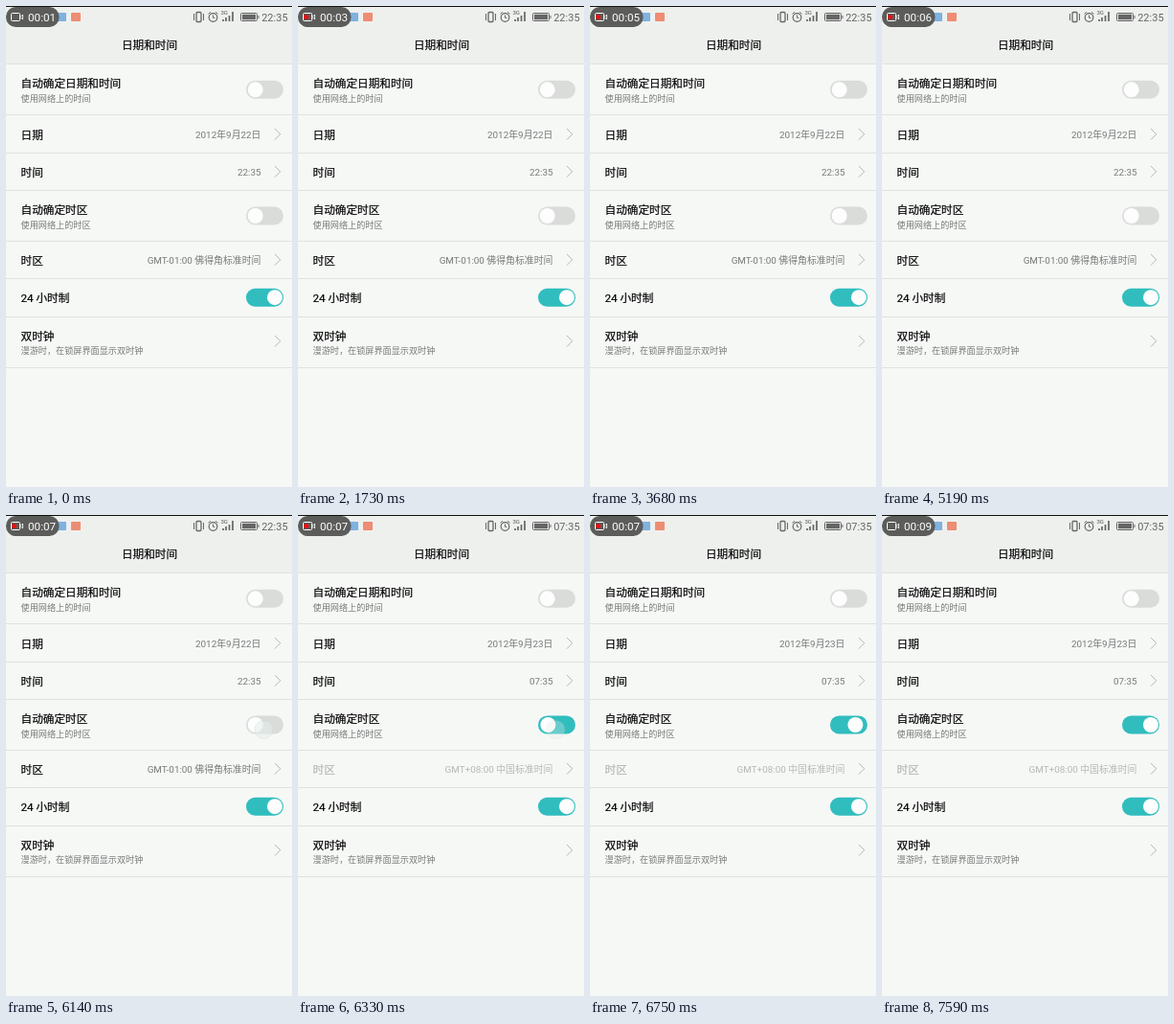
Animation, 299 px wide and 502 px high, one loop 8000 ms. Source, as an HTML page:

```html
<!DOCTYPE html>
<html lang="zh-CN">
<head>
<meta charset="utf-8">
<title>日期和时间</title>
<style>
html, body { margin: 0; width: 100%; height: 100%; overflow: hidden; background: #f6f8f6; }
svg { display: block; width: 299px; height: 502px; font-family: Roboto, "Noto Sans CJK SC", "Noto Sans CJK", sans-serif; }
.title { font-size: 11.65px; fill: #050505; stroke: #050505; stroke-width: .2px; }
.note { font-size: 9.15px; fill: #777a78; }
.value { font-size: 9.9px; fill: #777a78; text-anchor: end; }
</style>
</head>
<body>
<svg viewBox="0 0 299 502">
  <rect width="299" height="502" fill="#f6f8f6"/>
  <rect width="299" height="60" fill="#eef0ee"/>
  <rect width="299" height="1" fill="#111"/>

  <g id="status" fill="none" stroke="#666" stroke-width="1">
    <rect x="53" y="7" width="10" height="9" rx="1" fill="#7fb2df" stroke="none"/>
    <rect x="68" y="7" width="10" height="9" rx="1" fill="#ee8d73" stroke="none"/>
    <rect x="199" y="6.500" width="5" height="10" rx="1" stroke-width="1.300"/>
    <path d="M196.500 8v7M206.500 8v7"/>
    <circle cx="216.500" cy="12" r="4.300" stroke-width="1.200"/>
    <path d="M216.500 9.500V12.300H218.500M211.500 8.300l2.400-2M221.500 8.300l-2.400-2"/>
    <path d="M227 16v-2M230 16v-4M233.500 16v-6M237 16V6" stroke-width="1.700"/>
    <rect x="245.500" y="7.500" width="17" height="8" rx="1"/>
    <path d="M247 11.500h14" stroke-width="5.500"/>
    <path d="M264 10v3"/>
    <text x="224.500" y="9" font-size="6" fill="#555" stroke="none">3G</text>
    <text id="clock" x="294.600" y="16" font-size="11" fill="#666" stroke="none" text-anchor="end"></text>
  </g>

  <rect x="0" y="1" width="55.500" height="21" rx="10" fill="#5c5c5b"/>
  <g fill="none" stroke="#fff">
    <rect x="5.500" y="7.500" width="9" height="8" rx="1"/>
    <path d="M15 11.500l2.500-2.500v5z" stroke-width=".8"/>
  </g>
  <circle id="recDot" cx="8.500" cy="11.500" r="2.500" fill="#e8100f"/>
  <text id="counter" x="23" y="16" font-size="11.700" fill="#fff"></text>

  <text class="title" x="150" y="45" text-anchor="middle">日期和时间</text>
  <g id="rows"></g>
  <circle id="touch" cx="269.500" cy="224" r="9.500" fill="#e4eeec" stroke="#c5d3d1" stroke-width=".7"/>
</svg>
<script>
const LOOP = 8000;
const OFF = [218, 220, 218], ON = [49, 189, 190];
const $ = id => document.getElementById(id);
const rows = $('rows');

function add(tag, attrs, text = '') {
  const node = document.createElementNS('http://www.w3.org/2000/svg', tag);
  for (const key in attrs) node.setAttribute(key, attrs[key]);
  node.textContent = text;
  rows.appendChild(node);
  return node;
}

const label = (cls, x, y, text) => add('text', { class: cls, x, y }, text);
const arrow = y => add('path', {
  d: `M281 ${y - 6}l5.800 5.800l-5.800 5.800`, fill: 'none', stroke: '#b4b7b5', 'stroke-width': 1
});

function toggle(y) {
  const track = add('rect', { x: 251, y: y - 9.5, width: 39, height: 19, rx: 9.5 });
  const knob = add('circle', { cy: y, r: 8, fill: '#fcfdfc' });
  return (slide, tint) => {
    track.setAttribute('fill', `rgb(${OFF.map((c, i) => Math.round(c + (ON[i] - c) * tint))})`);
    knob.setAttribute('cx', 260.7 + 20.3 * slide);
  };
}

for (const y of [60, 113, 153, 192, 245, 284, 324, 377])
  add('rect', { x: 0, y, width: 299, height: 1, fill: '#e0e2e0' });

label('title', 15.5, 85, '自动确定日期和时间');
label('note', 15.5, 100, '使用网络上的时间');
label('title', 15.5, 138.5, '日期');
label('title', 15.5, 177.5, '时间');
label('title', 15.5, 217, '自动确定时区');
label('note', 15.5, 231.5, '使用网络上的时区');
const zoneTitle = label('title', 15.5, 270, '时区');
label('title', 15.5, 309, '24 小时制');
label('title', 15.5, 348.5, '双时钟');
label('note', 15.5, 363, '漫游时，在锁屏界面显示双时钟');

const dateValue = label('value', 266.5, 137.5, '');
const timeValue = label('value', 266.5, 177, '');
const zoneValue = label('value', 266.5, 269, '');
[134, 173, 265, 350].forEach(arrow);

toggle(87.3)(0, 0);
const setAutoZone = toggle(219);
toggle(304.2)(1, 1);

const secondTicks = [720, 1730, 2690, 3680, 4690, 5650, 6930, 7540];
const dotSwitches = [250, 770, 1240, 2720, 3180, 3700, 4170, 4690, 5190, 5710, 6050, 6930, 7100, 7590];
const passed = (times, t) => times.filter(at => at <= t).length;
const ramp = (t, from, to) => Math.min(1, Math.max(0, (t - from) / (to - from)));
const ease = p => (1 - Math.cos(Math.PI * p)) / 2;

function render(t) {
  $('counter').textContent = '00:0' + (1 + passed(secondTicks, t));
  $('recDot').style.display = passed(dotSwitches, t) % 2 ? '' : 'none';

  const automatic = t >= 6270;
  const time = automatic ? '07:35' : '22:35';
  $('clock').textContent = timeValue.textContent = time;
  dateValue.textContent = automatic ? '2012年9月23日' : '2012年9月22日';
  zoneValue.textContent = automatic ? 'GMT+08:00 中国标准时间' : 'GMT-01:00 佛得角标准时间';
  zoneTitle.style.fill = zoneTitle.style.stroke = automatic ? '#b5b7b5' : '';
  zoneValue.style.fill = automatic ? '#b5b7b5' : '';

  setAutoZone(ease(ramp(t, 6250, 6940)), ramp(t, 6200, 6300));
  $('touch').setAttribute('opacity', 0.5 * ramp(t, 6050, 6110) * (1 - ramp(t, 6270, 6430)));
}

let start;
function frame(now) {
  start ??= now;
  render((now - start) % LOOP);
  requestAnimationFrame(frame);
}
render(0);
requestAnimationFrame(frame);
</script>
</body>
</html>
```
